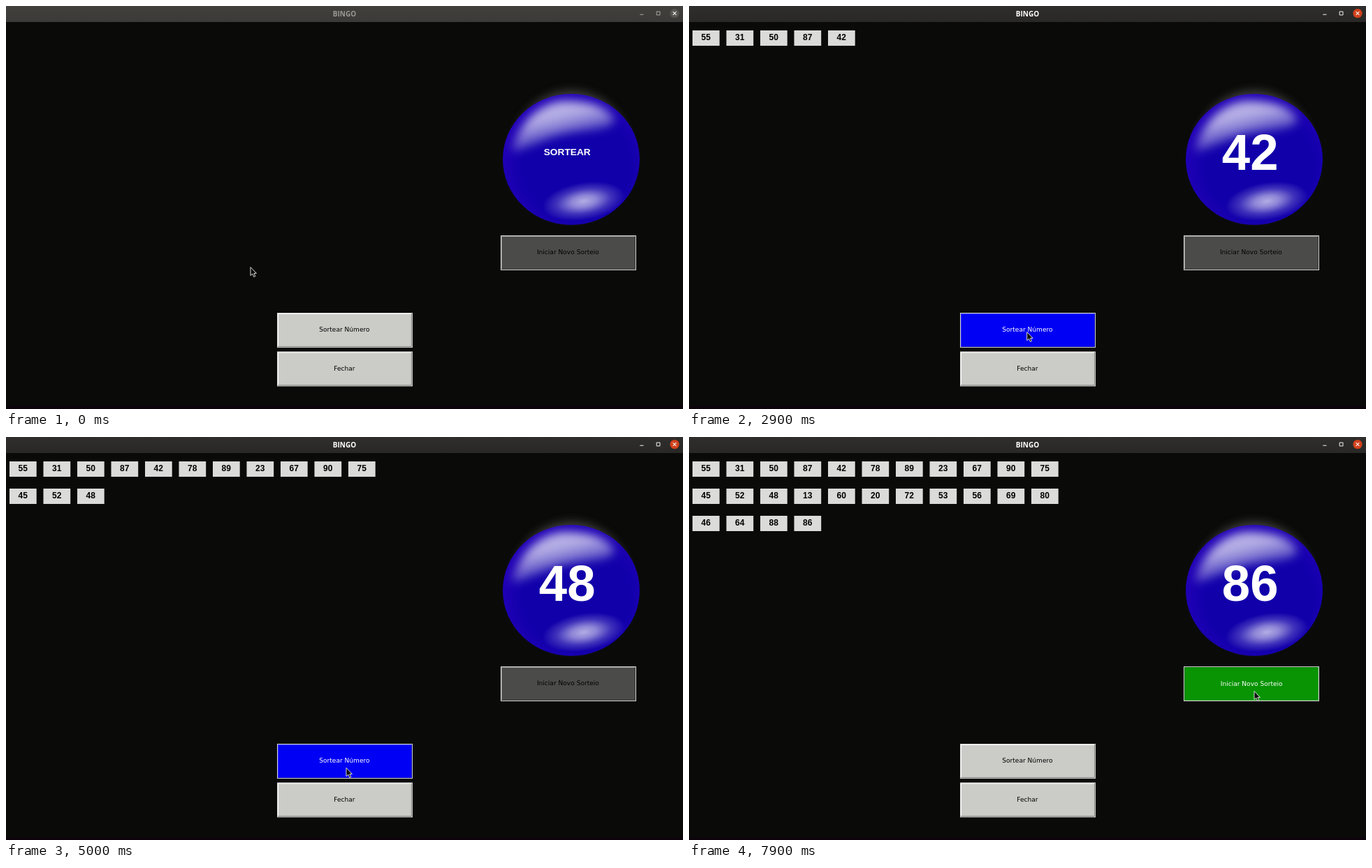
Write an HTML page that moves like this. It is 969x578 px and loops after 8000 ms.

```html
<!DOCTYPE html>
<html lang="pt">
<head>
<meta charset="utf-8">
<title>BINGO</title>
<style>
  html, body { margin: 0; width: 100%; height: 100%; overflow: hidden; background: #0a0b09; }
  svg { display: block; width: 969px; height: 578px; }
  text { text-anchor: middle; }
  .label { font: 9.07px "DejaVu Sans", sans-serif; }
  .bold { font-family: "Liberation Sans", sans-serif; font-weight: bold; }
  .title { font: bold 10px "Open Sans", sans-serif; }
</style>
</head>
<body>
<svg viewBox="0 0 969 578" xmlns="http://www.w3.org/2000/svg">
  <defs>
    <linearGradient id="barOff" x2="0" y2="1"><stop stop-color="#42403d"/><stop offset="1" stop-color="#3c3a38"/></linearGradient>
    <linearGradient id="barOn" x2="0" y2="1"><stop stop-color="#302e2c"/><stop offset="1" stop-color="#292826"/></linearGradient>
    <radialGradient id="ballFill" cx=".54" cy=".55" r=".56">
      <stop offset=".7" stop-color="#1100aa"/><stop offset="1" stop-color="#2100b6"/>
    </radialGradient>
    <linearGradient id="shine" gradientUnits="userSpaceOnUse" x1="797" y1="134" x2="812" y2="196">
      <stop stop-color="#fff" stop-opacity=".7"/><stop offset=".35" stop-color="#fff" stop-opacity=".68"/>
      <stop offset="1" stop-color="#fff" stop-opacity=".12"/>
    </linearGradient>
    <radialGradient id="spot">
      <stop stop-color="#fff" stop-opacity=".68"/><stop offset=".3" stop-color="#fff" stop-opacity=".52"/>
      <stop offset=".65" stop-color="#fff" stop-opacity=".2"/><stop offset="1" stop-color="#fff" stop-opacity="0"/>
    </radialGradient>
    <filter id="soft" x="-20%" y="-30%" width="140%" height="160%"><feGaussianBlur stdDeviation="7"/></filter>
    <clipPath id="ballClip"><ellipse cx="809" cy="220" rx="98" ry="94"/></clipPath>
  </defs>
  <rect width="969" height="578" fill="#0a0b09"/>
  <rect y="574" width="969" height="4" fill="#0c030b"/>

  <rect id="bar" width="969" height="23"/>
  <text id="title" class="title" x="484.5" y="14.7">BINGO</text>
  <g id="icons" fill="none">
    <path d="M907.3 12.2h5.2M931.2 8h4.8v4.9h-4.8z"/>
    <circle id="close" cx="957" cy="10.5" r="6.6" stroke="none"/>
    <path d="M954.6 8.1l4.8 4.8M959.4 8.1l-4.8 4.8" stroke="#f4f2ef" stroke-width="1.2"/>
  </g>

  <ellipse cx="809" cy="213" rx="84" ry="91" fill="#5d5b58" opacity=".7" filter="url(#soft)"/>
  <ellipse cx="809" cy="220" rx="98" ry="94" fill="url(#ballFill)"/>
  <g clip-path="url(#ballClip)">
    <path d="M724 208C733 171 762 137 801 136C839 136 866 148 871 164C867 179 831 176 797 184C767 190 744 208 724 208Z" fill="url(#shine)" filter="url(#soft)"/>
    <ellipse cx="827" cy="280" rx="60" ry="27" fill="url(#spot)" transform="rotate(-9 827 280)"/>
  </g>
  <text id="ballText" class="bold" x="803.2" fill="#fff"/>
  <g id="chips"/>
  <g id="buttons"/>
  <path id="cursor" d="M0 .5V12.6L2.8 10.1L4.8 14.5L6.8 13.6L4.9 9.4H8.4Z" fill="#080808" stroke="#f2f2f2" stroke-width=".9"/>
</svg>
<script>
const LOOP = 8000, TICK = 100, COLUMNS = 11;
const numbers = "55 31 50 87 42 78 89 23 67 90 75 45 52 48 13 60 20 72 53 56 69 80 46 64 88 86".split(" ");

// Pace of the draw: [tick, index of the latest number]
const pace = [[20.5, -1], [28, 4], [35, 5], [36, 6], [58, 17], [71, 25]];

// Pointer stops: [tick, x, y]
const stops = [
  [2, 350, 374], [9, 793, 354], [11, 793, 354], [13, 777, 359], [15, 490, 449],
  [22, 476, 451], [33, 487, 474], [73, 487, 474], [79, 809, 364]
];

const skins = {
  plain: { fill: "#cbccc8", light: "#ffffff", dark: "#7d7e7b", text: "#000" },
  blue: { fill: "#0000f4", light: "#3030ff", dark: "#0000b4", text: "#fff" },
  green: { fill: "#089403", light: "#2ca628", dark: "#067502", text: "#fff" },
  gray: { fill: "#4b4b49", light: "#92928f", dark: "#393937", text: "#000" }
};

const $ = id => document.getElementById(id);

function set(el, attrs) {
  for (const key in attrs) el.setAttribute(key, attrs[key]);
}

function make(parent, tag, attrs, text) {
  const el = document.createElementNS("http://www.w3.org/2000/svg", tag);
  set(el, attrs);
  if (text) el.textContent = text;
  return parent.appendChild(el);
}

const linear = f => f;
const smooth = f => f * f * (3 - 2 * f);

// Values of a key list at time t, held before the first and after the last key
function sample(keys, t, ease) {
  const next = keys.findIndex(key => key[0] > t);
  if (next === 0) return keys[0].slice(1);
  if (next < 0) return keys[keys.length - 1].slice(1);
  const a = keys[next - 1], b = keys[next];
  const f = ease((t - a[0]) / (b[0] - a[0]));
  return a.slice(1).map((v, i) => v + (b[i + 1] - v) * f);
}

const drawnAt = tick => Math.floor(sample(pace, tick + 0.49, linear)[0]) + 1;

// The mouse button goes down on the tick before a number, if there is time
const pressedAt = tick => drawnAt(tick + 1) > drawnAt(tick) && drawnAt(tick) === drawnAt(tick - 1);

function makeButton(x, y, label) {
  const g = make($("buttons"), "g", { transform: `translate(${x} ${y})` });
  make(g, "rect", { width: 194, height: 50, fill: "#d4d4d2" });
  const face = make(g, "rect", { x: 1, y: 1, width: 192, height: 48 });
  const topLeft = make(g, "path", { d: "M1.5 49V1.5H193", fill: "none" });
  const bottomRight = make(g, "path", { d: "M1 48.5H192.5V1", fill: "none" });
  const text = make(g, "text", { class: "label" }, label);
  return (skin, pressed) => {
    const s = skins[skin], shift = pressed ? 0.8 : 0;
    set(face, { fill: s.fill });
    set(topLeft, { stroke: pressed ? s.dark : s.light });
    set(bottomRight, { stroke: pressed ? s.light : s.dark });
    set(text, { x: 96.4 + shift, y: 27.4 + shift, fill: s.text });
  };
}

const restart = makeButton(708, 329, "Iniciar Novo Sorteio");
const draw = makeButton(388, 440, "Sortear Número");
makeButton(388, 495.5, "Fechar")("plain", false);

const chips = numbers.map((n, i) => {
  const x = 5 + 48.5 * (i % COLUMNS), y = 35 + 39 * Math.floor(i / COLUMNS);
  const g = make($("chips"), "g", { transform: `translate(${x} ${y})` });
  make(g, "rect", { width: 38.7, height: 22, fill: "#dbdbd9" });
  make(g, "text", { class: "bold", x: 19.2, y: 14.4, "font-size": 12 }, n);
  return g;
});

function render(ms) {
  const tick = Math.floor(ms / TICK);
  const count = drawnAt(tick);
  const focused = tick > 20;

  set($("bar"), { fill: focused ? "url(#barOn)" : "url(#barOff)" });
  set($("title"), { fill: focused ? "#fff" : "#9b9894" });
  set($("icons"), { stroke: focused ? "#f4f2ef" : "#aaa7a2" });
  set($("close"), { fill: focused ? "#d2411b" : "#585551" });

  chips.forEach((chip, i) => set(chip, { visibility: i < count ? "visible" : "hidden" }));
  $("ballText").textContent = count ? numbers[count - 1] : "SORTEAR";
  set($("ballText"), count ? { y: 235, "font-size": 72.6 } : { y: 214.4, "font-size": 13.7 });

  const overRestart = (tick >= 6 && tick < 14) || tick >= 78;
  const overDraw = tick >= 15 && tick < 72;
  restart(overRestart ? "green" : "gray", tick === 79);
  draw(overDraw ? "blue" : "plain", pressedAt(tick));

  set($("cursor"), { transform: `translate(${sample(stops, tick, smooth)})` });
}

const start = performance.now();
function loop() {
  render((performance.now() - start) % LOOP);
  requestAnimationFrame(loop);
}
loop();
</script>
</body>
</html>
```
